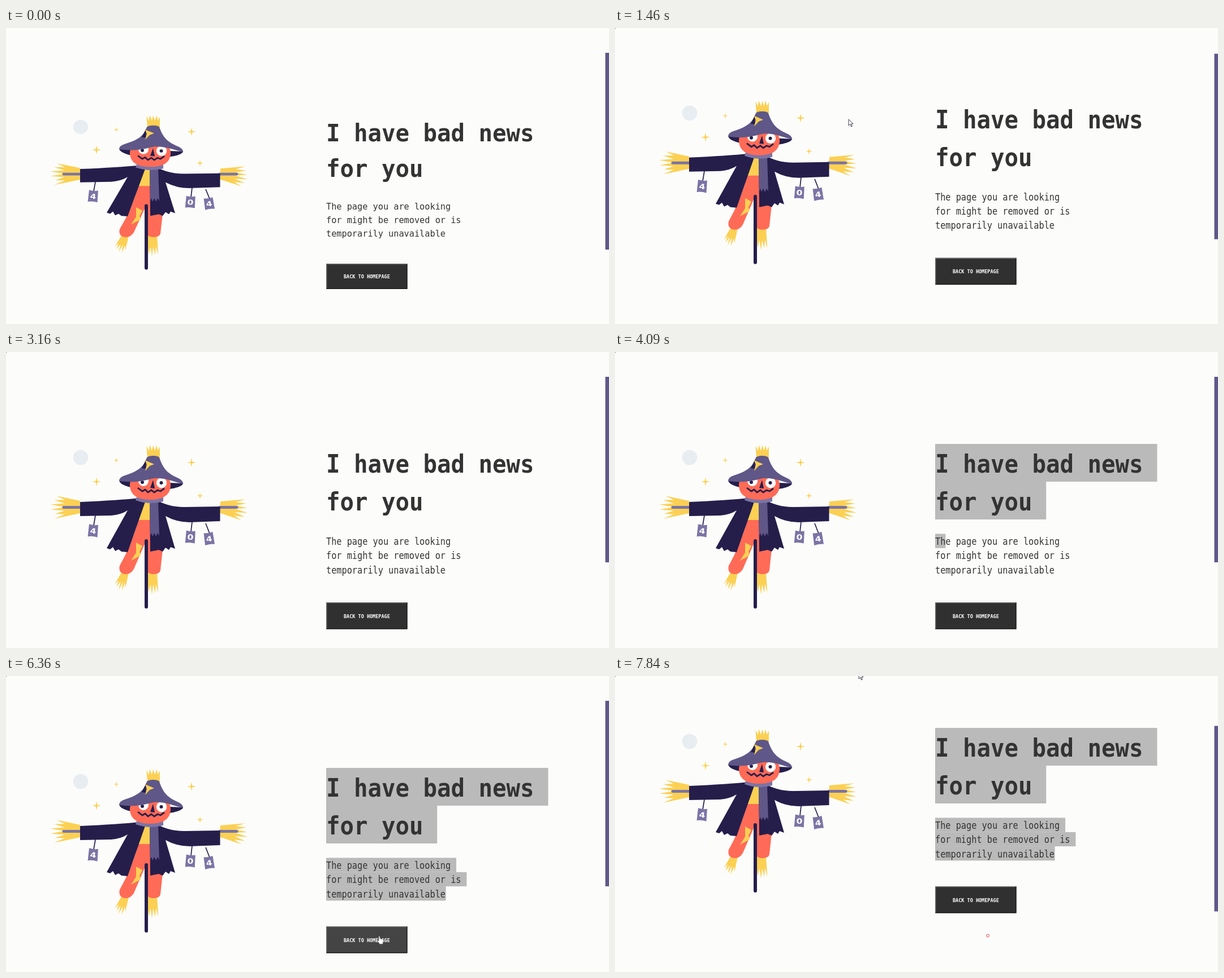
An HTML page that plays this animation: 1066 by 525 pixels, repeating every 7.92 s.

```html
<!DOCTYPE html>
<html lang="en">
<head>
<meta charset="utf-8">
<title>Page not found</title>
<style>
  html, body { margin: 0; width: 100%; height: 100%; overflow: hidden; background: #fcfcfa; }
  svg { display: block; width: 100vw; height: 100vh; }
  text { font-family: "DejaVu Sans Mono", monospace; fill: #333; white-space: pre; }
  .title { font-size: 40.7px; font-weight: bold; }
  .body { font-size: 15.25px; }
  .label { font-size: 8.5px; font-weight: bold; fill: #fff; }
  .digit { font: bold 13px "DejaVu Sans", sans-serif; fill: #fff; text-anchor: middle; }
  .navy { fill: #251e4b; }
  .purple { fill: #5f5788; }
  .lilac { fill: #7b74a5; }
  .orange { fill: #ff6b57; }
  .yellow { fill: #fbd053; }
  .line { fill: none; stroke: #251e4b; }
  .stick { stroke: #7b74a5; stroke-width: 5; stroke-linecap: round; }
</style>
</head>
<body>
<svg viewBox="0 0 1066 525" preserveAspectRatio="none">
  <rect width="1066" height="525" fill="#fcfcfa"/>
  <g id="page">
    <circle cx="132" cy="187" r="13.3" fill="#e8edf2"/>
    <g id="stars" class="yellow"></g>
    <g id="straw" class="yellow"></g>
    <path class="stick" d="M102 275.5H131M378 275.5H408"/>

    <path class="yellow" d="M242 264H258V302H234Z"/>
    <path class="orange" d="M234 298H258L277 350L273 387Q272 394 261 394Q249 394 248 384L247 336L226 385Q220 395 210 394Q198 392 201 379Q222 342 234 298Z"/>
    <path class="yellow" d="M230 338L241 344L236 354L238 361L221 370L230 356Z"/>
    <path class="line" d="M248 335V452" stroke-width="6" stroke-linecap="round"/>
    <path class="navy" d="M236 259Q200 263 131 266V291L186 290Q202 289 215 281L178 348L184 350L189 346L193 353L199 350L204 354L215 355L246 266Z"/>
    <path class="navy" d="M262 260Q285 275 315 275L378.5 274V300L324 302Q302 302 282 291L299 349L291 346L288 351L282 347L277 354L270 351L255 354L254 262Z"/>

    <path class="purple" d="M254 266L269 265L271 326L268 321L265 327L262 321L259 327L257 321L255 326Z"/>
    <path class="lilac" d="M231 257Q254 265 278 257L278 265Q255 272 229 263Z"/>

    <path class="navy" d="M200 228C204 248 308 250 313 233Z"/>
    <path class="orange" d="M219 238C218 222 232 214 255 214S292 221 291 238Q289 262 255 262T219 238Z"/>
    <g fill="#fff">
      <circle cx="243" cy="229" r="9"/>
      <circle cx="275" cy="232" r="9.2"/>
    </g>
    <g class="navy">
      <circle cx="241" cy="231" r="3"/>
      <circle cx="274.5" cy="232" r="3"/>
      <path d="M260 227L255 241L263 242Z"/>
    </g>
    <path class="line" d="M233 241L241 247L246 244L251 249L257 245L262 249L268 245L273 247L280 242" stroke-width="2.8"/>
    <path class="purple" d="M249 187Q252 184 260 184T271 187C279 212 290 217 307 225Q314 230 313 234C295 229 276 222 262 224C246 227 235 233 200 229Q200 222 210 219C235 211 244 203 249 187Z"/>
    <path class="navy" d="M248 190L240 206L247 207Z"/>
    <path class="yellow" d="M246 192L262 199L254 202L246 211L249 200Z"/>
    <g id="tags"></g>

    <g id="copy"></g>
    <rect id="button" x="566" y="444" width="143.5" height="47.5"/>
    <path d="M566 491.5V444H709.5L708 445.5H567.5V490Z" fill="#6b6b6b"/>
    <path d="M566 491.5H709.5V444L708 445.5V490H567.5Z" fill="#1c1c1c"/>
    <g id="caption"></g>
  </g>
  <rect id="bar" x="1059.5" width="6.5" fill="#5f5788"/>
  <rect id="dot" width="1" height="1" fill="#333"/>
  <circle id="ring" cx="659" cy="460.5" r="2.4" fill="none" stroke="#dd4455"/>
  <g id="cursor" stroke-linejoin="round">
    <path id="arrow" d="M0 0V11L2.7 8.6L4.6 13L6.3 12.2L4.4 8H8Z" fill="#fff" stroke="#2a2740" stroke-width=".9"/>
    <path id="hand" d="M0 1.5Q1 -.5 2 1.5V5L7 6.2Q8.5 7 8 9L6.8 14.5H1.8L-2 9.5Q-2 7.5 0 9Z" fill="#fff" stroke="#555" stroke-width=".5"/>
  </g>
</svg>
<script>
const LOOP = 7920, LEFT = 566, BAR_LAG = 165, BAR_RATIO = .627;
const $ = id => document.getElementById(id);
const set = (el, attrs) => { for (const k in attrs) el.setAttribute(k, attrs[k]); return el; };
const add = (parent, tag, attrs, text = "") => {
  const el = set(document.createElementNS("http://www.w3.org/2000/svg", tag), attrs);
  el.textContent = text;
  return parent.appendChild(el);
};
const show = (el, on) => set(el, { visibility: on ? "visible" : "hidden" });
const clamp = v => Math.max(0, Math.min(1, v));
const progress = (t, start, length) => clamp((t - start) / length);
const ease = u => u * u * (3 - 2 * u);
const bump = u => Math.sin(Math.PI * u) ** 2;

let seed = 7;
const random = () => (seed = seed * 16807 % 2147483647) / 2147483647;

function star(x, y, r) {
  const points = Array.from({ length: 8 }, (_, i) => {
    const a = i * Math.PI / 4, d = i % 2 ? r * .24 : r;
    return [x + d * Math.cos(a), y + d * Math.sin(a)];
  });
  add($("stars"), "polygon", { points });
}

// A bunch of straw: spikes spread around a direction, notched between the tips.
function straw(x, y, degrees, spread, length, half, tips) {
  const rad = Math.PI / 180, dir = degrees * rad, last = tips * 2;
  const points = Array.from({ length: last + 1 }, (_, i) => {
    const u = i / last * 2 - 1, a = dir + u * spread * rad;
    const edge = i === 0 || i === last;
    const reach = edge ? 0 : i % 2 ? length * (1 - .2 * u * u - .15 * random()) : length * .5;
    return [x - Math.sin(dir) * u * half + reach * Math.cos(a),
            y + Math.cos(dir) * u * half + reach * Math.sin(a)];
  });
  add($("straw"), "polygon", { points });
}

function tag(x, y, angle, digit, hookX) {
  add($("tags"), "path", { d: `M${hookX} ${y - 27}L${x + 1} ${y - 9}`, class: "line", "stroke-width": 1.7 });
  const g = add($("tags"), "g", { transform: `translate(${x} ${y}) rotate(${angle})` });
  add(g, "path", { d: "M-8 -11Q0 -9 8 -11L8.5 11Q0 9 -8.5 11Z", class: "lilac" });
  add(g, "text", { y: 5, class: "digit", transform: "scale(1.2 1)" }, digit);
}

star(195, 192, 5);
star(328, 196, 8);
star(160, 230, 8);
star(343, 255, 6);
straw(131, 275, 180, 17, 55, 11, 6);
straw(378, 275, 7, 17, 55, 10, 6);
straw(211, 391, 111, 14, 35, 6, 5);
straw(258, 391, 90, 8, 42, 9, 5);
straw(261, 188, -92, 10, 26, 11, 5);
tag(154, 317, 5, "4", 158);
tag(326, 328, 4, "0", 329);
tag(359, 331, -8, "4", 353);

const write = (parent, kind, x, y, text) =>
  add(parent, "text", { class: kind, transform: `translate(${x} ${y}) scale(1 1.1)` }, text);

// Stacks lines of text, each with the mark that highlights it.
function paragraph(kind, top, height, ascent, advance, rows) {
  return rows.map((text, i) => {
    const y = top + i * height;
    const mark = add($("copy"), "rect", { x: LEFT, y, height, fill: "#bababa" });
    write($("copy"), kind, LEFT, y + ascent, text);
    return { mark, advance, chars: text.length };
  });
}
const lines = [
  ...paragraph("title", 163, 67, 51, 24.53, ["I have bad news ", "for you "]),
  ...paragraph("body", 322.5, 25.3, 19.4, 9.2,
    ["The page you are looking ", "for might be removed or is ", "temporarily unavailable"])
];
write($("caption"), "label", 597, 471.5, "BACK TO HOMEPAGE");

// Down and back twice, then a short scroll that stays.
const scroll = t =>
  239 * bump(progress(t, 80, 560)) +
  110 * bump(progress(t, 1240, 1135)) +
  71 * ease(progress(t, 7200, 440));

// Time, x, y
const stops = [[300, 434, 20], [800, 413, 162], [1670, 413, 162], [2270, 322, 175],
  [2800, 560, 195], [5450, 600, 420], [5800, 659, 461], [7740, 659, 461], [7830, 431, -6]];

function pointer(t) {
  const next = stops.findIndex(s => s[0] > t);
  const [t1, x1, y1] = stops.at(next);
  const [t0, x0, y0] = next > 0 ? stops[next - 1] : stops.at(next);
  const u = t1 > t0 ? ease(progress(t, t0, t1 - t0)) : 1;
  return [x0 + (x1 - x0) * u, y0 + (y1 - y0) * u];
}

function draw(t) {
  const opening = t < 80, dy = -scroll(t);
  set($("page"), { transform: opening ? "translate(0 -1) scale(1 .944)" : `translate(0 ${dy})` });
  set($("bar"), { y: 44 + BAR_RATIO * scroll(t - BAR_LAG), height: opening ? 349 : 329 });

  lines.forEach(({ mark, advance, chars }, i) =>
    set(mark, { width: Math.round(progress(t, 3420 + i * 322, 322) * chars) * advance }));

  const [x, y] = pointer(t);
  const visible = (t > 300 && t < 2800) || t > 5450;
  const hover = visible && x > LEFT && x < 709 && y > 444 + dy && y < 491 + dy;
  set($("button"), { fill: hover ? "#444" : "#303030" });
  set($("cursor"), { transform: `translate(${x} ${y})` });
  show($("arrow"), visible && !hover);
  show($("hand"), hover);
  show($("dot"), !opening);
  show($("ring"), t >= 7760);
}

const start = performance.now();
function tick() {
  draw((performance.now() - start) % LOOP);
  requestAnimationFrame(tick);
}
tick();
</script>
</body>
</html>
```
